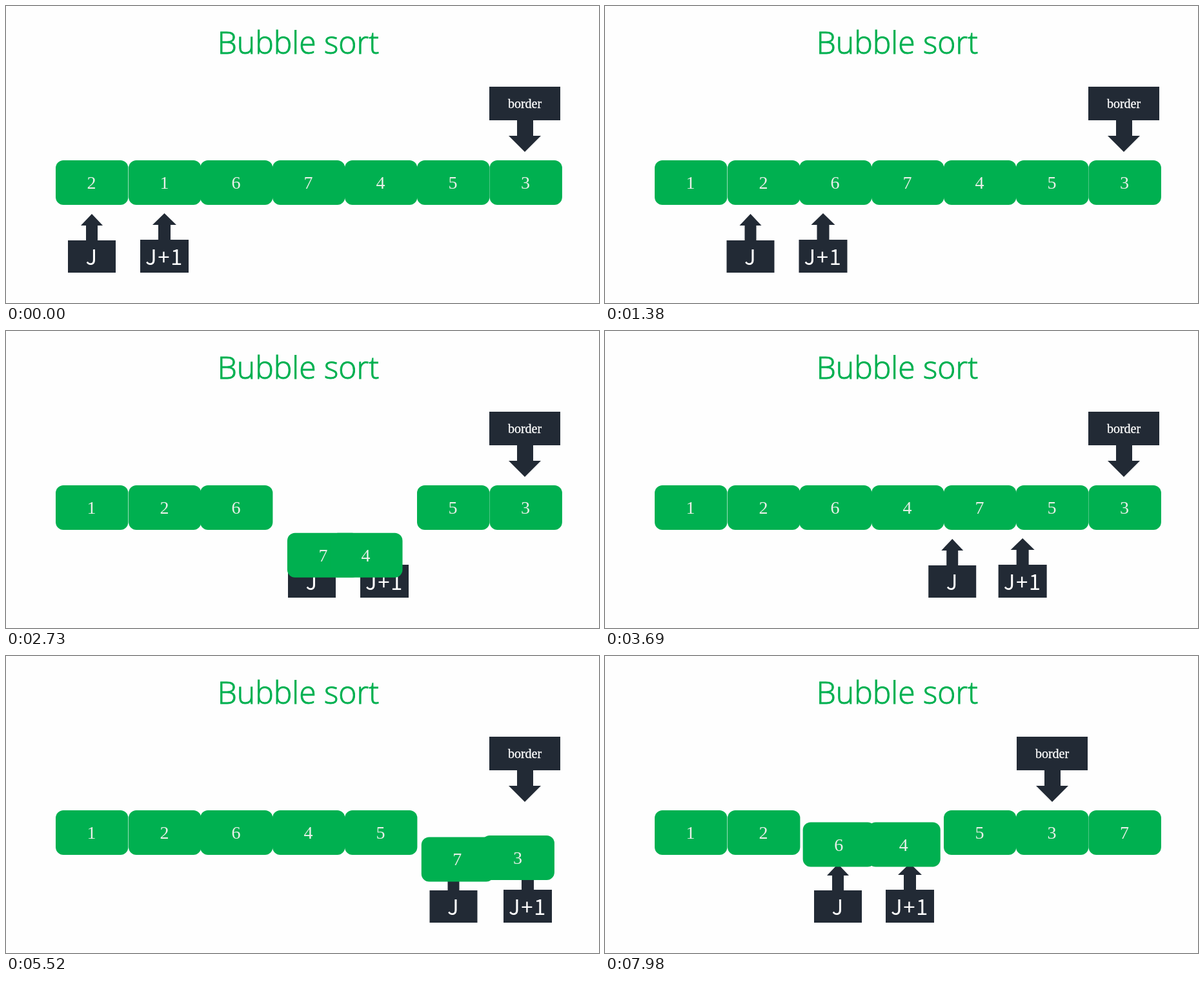
Animation, 919 px wide and 460 px high, one loop 8 s. Source, as an HTML page:

```html
<!DOCTYPE html>
<html lang="en">
<head>
<meta charset="utf-8">
<title>Bubble sort</title>
<style>
  html, body { margin: 0; width: 100%; height: 100%; overflow: hidden; background: #fefefe; }
  svg { display: block; width: 919px; height: 460px; }
  text { text-anchor: middle; }
  .title { font: 300 48px "Open Sans", sans-serif; fill: #00b050; stroke: #00b050; stroke-width: 0.9px; }
  .block rect { fill: #00b050; }
  .block text { font: 28px "Liberation Serif", serif; fill: #e9efe9; }
  .marker path { fill: #222a35; }
  .marker text { font: 300 33px "Noto Sans CJK SC", "Noto Sans CJK", sans-serif; letter-spacing: 1.5px; fill: #fff; }
  .marker .serif { font: 20px "Liberation Serif", serif; letter-spacing: 0; stroke: #fff; stroke-width: 0.3px; }
</style>
</head>
<body>
<svg viewBox="0 0 919 460">
  <text class="title" x="453" y="74">Bubble sort</text>
  <g class="marker" id="border">
    <path d="M0 125h110v52h-42v24h12l-25 25-25-25h13v-24h-43z"/>
    <text class="serif" x="55" y="158">border</text>
  </g>
  <g class="marker" id="left">
    <path d="M0 413v-50h28v-23h-8l17-18 17 18h-8v23h28v50z"/>
    <text x="37" y="400.5">J</text>
  </g>
  <g class="marker" id="right">
    <path d="M0 413v-51h28v-23h-9l18.500-18 18.500 18h-9v23h28v51z"/>
    <text x="37.5" y="400.5">J+1</text>
  </g>
  <g id="blocks"></g>
</svg>
<script>
const LOOP = 8000, TICK = 30, START = 46;
const SWAP = 964, MOVE = 482, RESET = 110, RAMP = 0.12;
const values = [2, 1, 6, 7, 4, 5, 3];
const slotX = [77, 190, 301, 413, 525, 637, 749.5];
const leftX = [96, 211, 324, 437, 550, 656.5];
const rightX = [208, 323, 435, 549, 655.7, 771];
const borderX = [749, 638];

// A curved path between neighbouring slots that dips to `depth` halfway.
function arc(from, to, depth, bend) {
  const path = document.createElementNS('http://www.w3.org/2000/svg', 'path');
  const x1 = slotX[from], x2 = slotX[to], shift = (x2 - x1) * bend, y = depth * 4 / 3;
  path.setAttribute('d', `M${x1} 0C${x1 + shift} ${y} ${x2 - shift} ${y} ${x2} 0`);
  const length = path.getTotalLength();
  return progress => path.getPointAtLength(progress * length);
}

const swap = (slot, depth = 138, bend = 0.5) => ({
  type: 'swap', slot, time: SWAP,
  forth: arc(slot, slot + 1, depth, bend),
  back: arc(slot + 1, slot, depth, 0.5)
});
const move = (to, time = MOVE) => ({ type: 'move', to, time });
const steps = [
  swap(0, 145), move(1), move(2), move(3),
  swap(3), move(4),
  swap(4), move(5),
  swap(5, 138, 0.22), { type: 'border', time: MOVE },
  move(0, RESET), move(1), move(2),
  swap(2)
];

const byId = id => document.getElementById(id);
byId('blocks').innerHTML = values.map(value =>
  `<g class="block"><rect y="239" width="112.4" height="69" rx="12"/><text x="55.5" y="283">${value}</text></g>`
).join('');
const blocks = [...byId('blocks').children];

const mix = (a, b, p) => a + (b - a) * p;
const place = (node, x, y = 0) => node.setAttribute('transform', `translate(${x} ${y})`);

// Constant speed with a short ramp at both ends.
function ease(p) {
  if (p > 0.5) return 1 - ease(1 - p);
  return p < RAMP ? p * p / (2 * RAMP * (1 - RAMP)) : (p - RAMP / 2) / (1 - RAMP);
}

function draw(time) {
  const order = values.map((_, i) => i);
  const pos = slotX.map(x => ({ x, y: 0 }));
  let slot = 0, left = leftX[0], right = rightX[0], border = borderX[0];
  let begin = START;

  for (const step of steps) {
    if (time <= begin) break;
    const e = ease(Math.min(1, (time - begin) / step.time));
    begin += step.time;
    if (step.type === 'swap') {
      const i = step.slot, [a, b] = [order[i], order[i + 1]];
      pos[a] = step.forth(e);
      pos[b] = step.back(e);
      [order[i], order[i + 1]] = [b, a];
    } else if (step.type === 'move') {
      left = mix(leftX[slot], leftX[step.to], e);
      right = mix(rightX[slot], rightX[step.to], e);
      slot = step.to;
    } else {
      border = mix(...borderX, e);
    }
  }

  blocks.forEach((block, i) => place(block, pos[i].x, pos[i].y));
  place(byId('left'), left);
  place(byId('right'), right);
  place(byId('border'), border);
}

const origin = performance.now();
function frame() {
  const time = (performance.now() - origin) % LOOP;
  draw(Math.floor(time / TICK) * TICK);
  requestAnimationFrame(frame);
}
frame();
</script>
</body>
</html>
```
